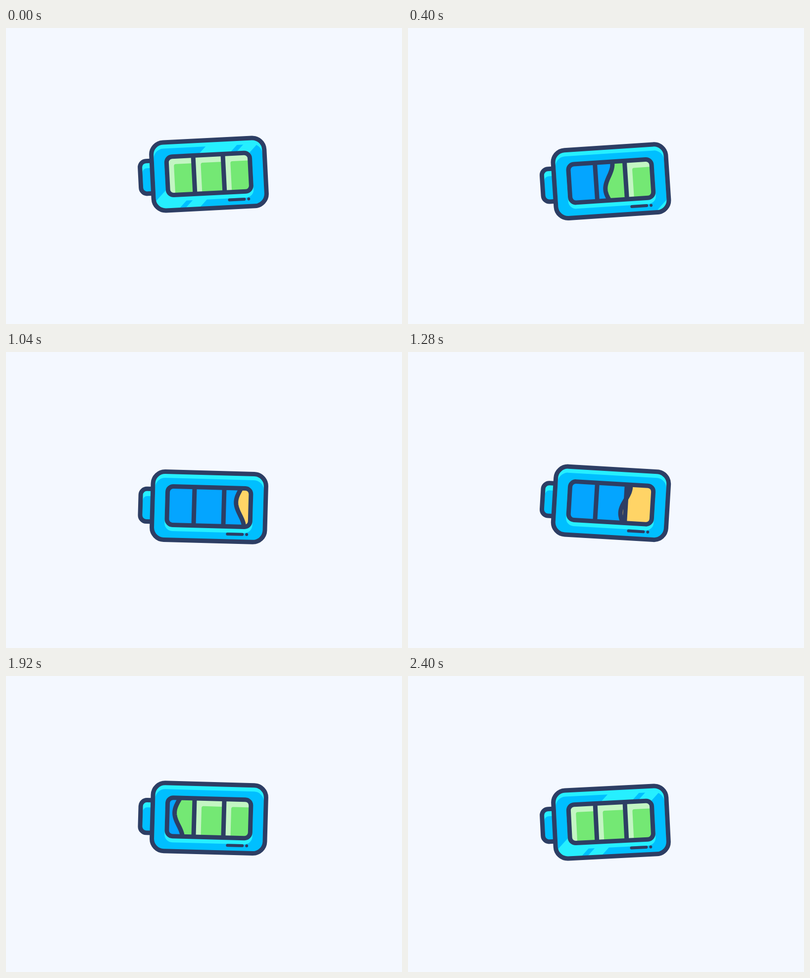
An HTML page that plays this animation: 800 by 600 pixels, repeating every 2440 ms.

```html
<!DOCTYPE html>
<html lang="en">
<head>
<meta charset="utf-8">
<title>Battery</title>
<style>
  html, body { margin: 0; width: 100%; height: 100%; overflow: hidden; background: #f4f8ff; }
  svg { display: block; width: 100%; height: 100%; }
  .line { fill: none; stroke: #2d3e64; stroke-width: 9; }
  .thin { stroke-width: 6; stroke-linecap: round; }
  .blue { fill: #00bfff; }
  .light { fill: #26efff; }
  .empty { fill: #04a5ff; }
  .ink { fill: #2d3e64; }
</style>
</head>
<body>
<svg viewBox="0 0 800 600">
  <defs>
    <rect id="cap" x="-128.5" y="-33.2" width="60" height="66.3" rx="12.5"/>
    <rect id="body" x="-104.2" y="-69" width="228.4" height="138" rx="24.5"/>
    <rect id="slot" x="-74.3" y="-39.5" width="168.4" height="78" rx="11.5"/>
    <clipPath id="capClip"><use href="#cap"/></clipPath>
    <clipPath id="bodyClip"><use href="#body"/></clipPath>
    <clipPath id="slotClip"><use href="#slot"/></clipPath>
  </defs>
  <g id="battery">
    <g clip-path="url(#capClip)">
      <use href="#cap" class="light"/>
      <rect class="blue" x="-124" y="-18.5" width="60" height="60" rx="9"/>
    </g>
    <use href="#cap" class="line"/>

    <g clip-path="url(#bodyClip)">
      <use href="#body" class="light"/>
      <rect class="blue" x="-99.7" y="-56.5" width="219.4" height="150" rx="20"/>
      <g id="shine" class="light">
        <path d="M29.5-80H93L-67 80H-130.5Z"/>
        <path d="M105.5-80H134.3L-25.7 80H-54.5Z"/>
      </g>
      <rect class="light" x="-78.8" y="-30" width="177.4" height="81" rx="16"/>
    </g>
    <use href="#body" class="line"/>

    <g clip-path="url(#slotClip)">
      <use href="#slot" class="empty"/>
      <path id="fluid" class="line"/>
      <g id="gloss" fill="#fff"></g>
      <path class="line" d="M-20-40V40M40-40V40"/>
    </g>
    <use href="#slot" class="line"/>
    <path class="line thin" d="M48.8 54H78.8"/>
    <circle class="ink" cx="87.7" cy="54" r="3"/>
  </g>
</svg>
<script>
const STEP = 40, LOOP = 2440, CYCLE = 2400;
const GREEN = [116, 232, 116], AMBER = [255, 212, 102];

// Time and mean x of the fluid's left edge
const LEVEL = [[0, -100], [400, 6.5], [720, 90], [770, 103], [830, 103],
  [1280, 39], [1600, -3.5], [1920, -51], [2200, -95], [2400, -100]];
const CELLS = [[-69.8, -24], [-15.5, 36], [44.5, 95]];

const $ = id => document.getElementById(id);
const clamp = v => Math.min(1, Math.max(0, v));
const smooth = u => u * u * (3 - 2 * u);

// Eased swing between +1 (at time peak) and -1, half a cycle apart
function swing(t, peak) {
  const half = CYCLE / 2;
  const d = ((t - peak) % CYCLE + CYCLE) % CYCLE;
  return 1 - 2 * smooth(d < half ? d / half : 2 - d / half);
}

function lookup(table, t) {
  const i = Math.max(1, table.findIndex(row => row[0] >= t));
  const [t0, v0] = table[i - 1], [t1, v1] = table[i];
  return v0 + (v1 - v0) * (t - t0) / (t1 - t0);
}

const gloss = CELLS.map(([l, r]) => {
  const p = document.createElementNS("http://www.w3.org/2000/svg", "path");
  p.setAttribute("d", `M${l - 5}-40H${r}V-24H${l + 14}q-4 0-4 4V40H${l - 5}Z`);
  $("gloss").append(p);
  return p;
});

function fluidPath(mid, crest) {
  let d = "M140 60V-60";
  for (let y = -60; y <= 60; y += 3) {
    const x = mid + 8.7 * Math.cos((y - crest) / 104 * 2 * Math.PI);
    d += `L${x.toFixed(2)} ${y}`;
  }
  return d + "Z";
}

function draw(t) {
  const y = 302.8 + 15 * swing(t, 760);
  const angle = -4 * swing(t, 280);
  $("battery").setAttribute("transform", `translate(400 ${y}) rotate(${angle})`);

  const sweep = t > CYCLE / 2 ? t - CYCLE : t;
  $("shine").setAttribute("transform", `translate(${sweep * 0.537} 0)`);

  const mid = lookup(LEVEL, t);
  const mix = t < 770 ? 1 : clamp((t - 1400) / 300);
  const color = AMBER.map((a, i) => Math.round(a + (GREEN[i] - a) * mix));
  $("fluid").setAttribute("d", fluidPath(mid, 0.12 * t - 84));
  $("fluid").style.fill = `rgb(${color})`;
  gloss.forEach((p, i) =>
    p.setAttribute("opacity", 0.57 * clamp((CELLS[i][0] - mid - 14) / 16)));
}

function tick() {
  const t = performance.now() % LOOP;
  draw(Math.floor(t / STEP) * STEP % CYCLE);
  requestAnimationFrame(tick);
}
tick();
</script>
</body>
</html>
```
